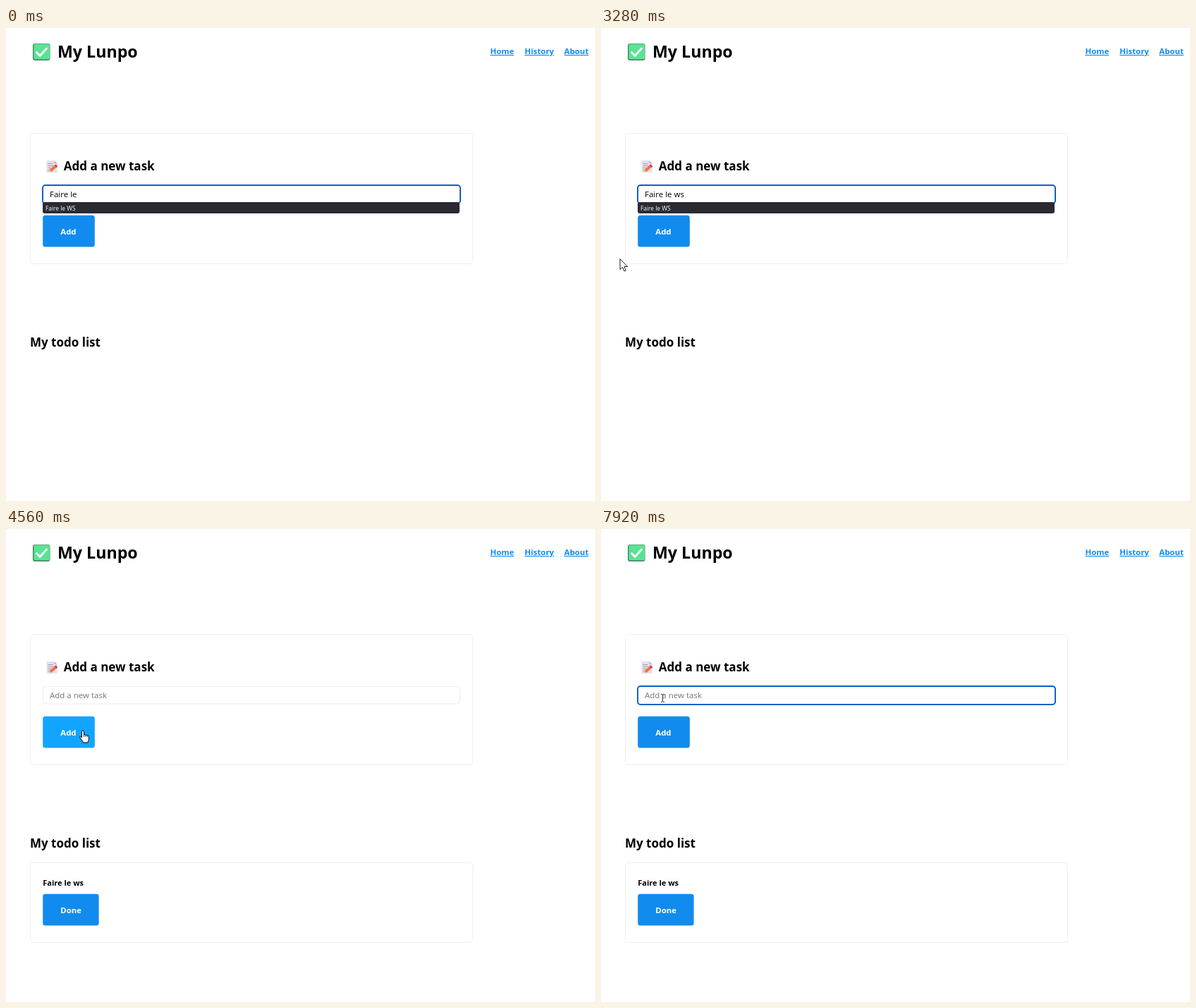
An HTML page for the animation above (8000 ms loop, 835 px wide and 671 px high).

```html
<!DOCTYPE html>
<html lang="en">
<head>
<meta charset="utf-8">
<title>Task list</title>
<style>
  html, body { margin: 0; width: 100%; height: 100%; overflow: hidden; background: #fff; }
  svg { display: block; width: 835px; height: 671px; font-family: "Open Sans", "Noto Sans", sans-serif; }
  .bold { font-weight: 700; }
  .h1 { font-size: 23.2px; }
  .h2 { font-size: 17px; }
  .small { font-size: 11.4px; }
  .task { font-size: 11px; }
  .field { font-size: 11.5px; }
  .option { font-size: 8.4px; fill: #fbfbfe; }
  .link { fill: #118bee; text-decoration: underline; }
  .card { fill: #fff; stroke: #efefef; }
  .button { fill: #118bee; }
  .button.hover { fill: #12a5ff; }
  .label { fill: #fff; }
  .cursor { stroke-linejoin: round; }
</style>
</head>
<body>
<svg viewBox="0 0 835 671">
  <!-- header -->
  <rect x="38" y="22" width="24.5" height="24" rx="3" fill="#477f60"/>
  <rect x="39.3" y="22.6" width="22.7" height="22" rx="2" fill="#59e392"/>
  <path d="M43.5 34.5l4.6 5L57.5 29" fill="none" stroke="#fff" stroke-width="2.8" stroke-linecap="round" stroke-linejoin="round"/>
  <text class="bold h1" x="73" y="42">My Lunpo</text>
  <g class="bold small link">
    <text x="686.5" y="37">Home</text>
    <text x="735.3" y="37">History</text>
    <text x="791.3" y="37">About</text>
  </g>

  <!-- form -->
  <rect class="card" x="34.5" y="149.5" width="627" height="185" rx="4"/>
  <g>
    <path d="M57.5 188h11l4 4v13h-15z" fill="#e3e0ea"/>
    <path d="M68.5 188v4h4z" fill="#bbb5c8"/>
    <path d="M59.5 192.5h7M59.5 195.5h8M59.5 198.5h5M59.5 201.5h3" stroke="#a29bb0"/>
    <path d="M63 202.5l8-7" stroke="#f4703c" stroke-width="4"/>
    <path d="M70 196.5l2-1.8" stroke="#e0355d" stroke-width="4"/>
    <path d="M60.5 204.6l1-3.4 2.6 2.8z" fill="#f0c08c"/>
  </g>
  <text class="bold h2" x="81.8" y="202.3">Add a new task</text>
  <rect x="52.5" y="223.5" width="591" height="24.5" rx="4" fill="#fff" stroke="#ececec"/>
  <rect id="ring" x="52" y="223" width="592" height="26" rx="4" fill="#fff" stroke="#0b61cf" stroke-width="2"/>
  <text id="value" class="field" x="62" y="240.3"></text>
  <path id="caret" d="M0 229v13" stroke="#000"/>
  <g id="options">
    <rect x="52" y="247" width="591" height="16" rx="3" fill="#2b2a33"/>
    <text class="option" x="56" y="258.5">Faire le WS</text>
  </g>
  <rect id="add" class="button" x="52.2" y="265.8" width="73.6" height="44.7" rx="3.5"/>
  <text class="bold small label" x="77.3" y="292.7">Add</text>

  <!-- list -->
  <text class="bold h2" x="34" y="452.3">My todo list</text>
  <g id="list">
    <rect class="card" x="34.5" y="473.5" width="627" height="113" rx="4"/>
    <text class="bold task" x="52.3" y="505.5">Faire le ws</text>
    <rect class="button" x="52.2" y="517.8" width="79.4" height="44.7" rx="3.5"/>
    <text class="bold small label" x="77.3" y="544.7">Done</text>
  </g>

  <!-- pointers, each with its hot spot at 0,0 -->
  <g id="arrow" class="cursor">
    <path d="M0 0v15l3.5-3.2 2.4 5.6 2.4-1-2.4-5.4h4.8z" fill="#fff" stroke="#000" stroke-width=".9"/>
  </g>
  <g id="hand" class="cursor">
    <path d="M-1.5 1.2Q-1.4 0 0 0T1.5 1.2V6q1.6-.8 2.4.4 1.6-.7 2.4.6 2-.5 2 1.4v4q0 2-1.2 3.4V17H-.2v-1.5L-4.2 10q-.6-1.6.8-1.7l1.9 1.6z" fill="#fff" stroke="#000"/>
    <path d="M1.5 6v3M3.9 6.6V9M6.3 7.2V9" stroke="#000" stroke-width=".8"/>
  </g>
  <g id="beam" class="cursor">
    <path d="M-2.5-5.5h1.7l.8.7.8-.7h1.7M0-5V5M-2.5 5.5h1.7L0 4.8l.8.7h1.7" fill="none" stroke="#333"/>
  </g>
</svg>
<script>
  const LOOP = 8000, STEP = 80, BLINK = 500;
  const TYPE_W = 240, TYPE_S = 560, SUBMIT = 4400, REFOCUS = 6400;

  // time, x, y of the pointer hot spot
  const pointerPath = [
    [3120, -8, 345], [3440, 62, 310], [3840, 119, 271], [4000, 119, 271], [4400, 109, 286],
    [5200, 109, 286], [5760, 121, 230], [6080, 121, 230], [6400, 120, 236],
    [6560, 120, 236], [6880, 134, 253], [7200, 134, 253], [7760, 87.5, 240], [8000, 87.5, 240]
  ];

  const el = id => document.getElementById(id);
  const show = (id, on) => el(id).setAttribute("visibility", on ? "visible" : "hidden");
  const ease = k => k * k * (3 - 2 * k);
  const inside = ([x, y], left, top, right, bottom) => x >= left && x <= right && y >= top && y <= bottom;

  function pointerAt(t) {
    const next = pointerPath.findIndex(p => p[0] > t);
    if (next < 1) return [-50, -50];
    const [t0, x0, y0] = pointerPath[next - 1], [t1, x1, y1] = pointerPath[next];
    const k = ease((t - t0) / (t1 - t0));
    return [x0 + (x1 - x0) * k, y0 + (y1 - y0) * k];
  }

  function drawField(t) {
    const typing = t < SUBMIT, focused = typing || t >= REFOCUS;
    const typed = t < TYPE_W ? "Faire le " : t < TYPE_S ? "Faire le w" : "Faire le ws";
    const value = el("value");

    value.textContent = typing ? typed : "Add a new task";
    value.setAttribute("fill", typing ? "#000" : "#757575");

    const blinkStart = t >= REFOCUS ? REFOCUS : t >= TYPE_S ? TYPE_S : t >= TYPE_W ? TYPE_W : -BLINK;
    const caretX = Math.round(typing ? 62 + value.getComputedTextLength() : 62) + .5;
    el("caret").setAttribute("transform", `translate(${caretX} 0)`);
    show("caret", focused && (t - blinkStart) % (2 * BLINK) < BLINK);
    show("ring", focused);
    show("options", typing);
    show("list", !typing);
  }

  function drawPointer(t) {
    const pos = pointerAt(t);
    const onButton = inside(pos, 52, 266, 126, 310);
    const kind = onButton ? "hand" : inside(pos, 52, 222, 644, 254) ? "beam" : "arrow";
    el("add").classList.toggle("hover", onButton);
    for (const id of ["arrow", "hand", "beam"]) show(id, id === kind);
    el(kind).setAttribute("transform", `translate(${pos})`);
  }

  function frame() {
    const t = Math.floor(performance.now() % LOOP / STEP) * STEP;
    drawField(t);
    drawPointer(t);
    requestAnimationFrame(frame);
  }
  frame();
</script>
</body>
</html>
```
